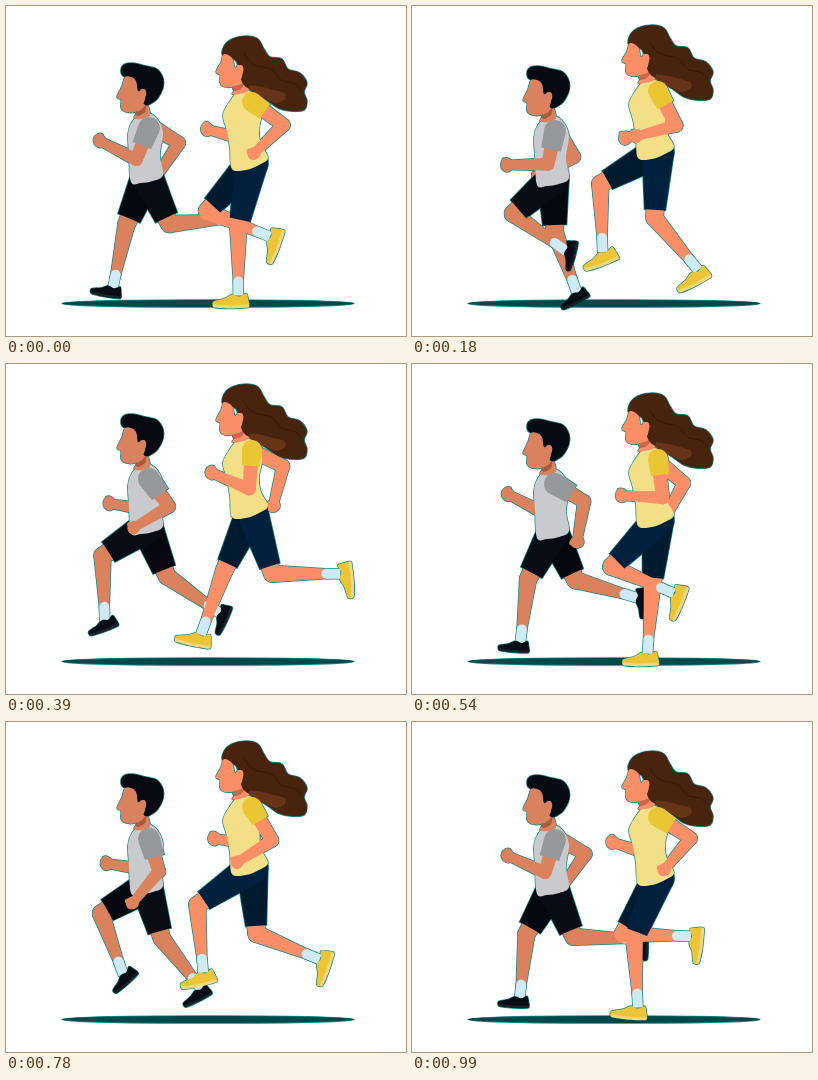
An HTML page with a canvas that plays this animation: 400x330 px, repeating every 1020 ms.

```html
<!DOCTYPE html>
<html lang="en">
<head>
<meta charset="utf-8">
<title>Runners</title>
<style>
html, body { margin: 0; width: 100%; height: 100%; overflow: hidden; background: #fff; }
canvas { display: block; width: 400px; height: 330px; }
</style>
</head>
<body>
<canvas id="stage" width="400" height="330"></canvas>
<script>
const ctx = document.getElementById('stage').getContext('2d');
const LOOP = 1020, HALF = LOOP / 2, STEP = 30;
const FRINGE = '#128a87';
let fringe = false;

// Periodic monotone cubic through rows of [time, ...values]
function sample(rows, period, time) {
  const n = rows.length;
  const row = i => rows[((i % n) + n) % n];
  const at = i => row(i)[0] + Math.floor(i / n) * period;
  const t = ((time % period) + period) % period;
  let i = n - 1;
  while (i >= 0 && at(i) > t) i--;
  const h = at(i + 1) - at(i), u = (t - at(i)) / h;
  return row(0).slice(1).map((_, c) => {
    const v = k => row(k)[c + 1];
    const rise = k => (v(k + 1) - v(k)) / (at(k + 1) - at(k));
    const slope = k => {
      const a = rise(k - 1), b = rise(k);
      return a * b <= 0 ? 0 : 2 * a * b / (a + b);
    };
    const p = v(i), q = v(i + 1);
    return p + (q - p) * u * u * (3 - 2 * u)
      + h * u * (1 - u) * (slope(i) * (1 - u) - slope(i + 1) * u);
  });
}

function paint(color) {
  if (fringe) {
    ctx.strokeStyle = FRINGE;
    ctx.lineWidth = 1.5;
    ctx.stroke();
  } else {
    ctx.fillStyle = color;
    ctx.fill();
  }
}

// Smooth closed outline through x,y pairs
function blob(color, p, tension = 6) {
  const n = p.length / 2;
  const X = i => p[((i + n) % n) * 2], Y = i => p[((i + n) % n) * 2 + 1];
  ctx.beginPath();
  ctx.moveTo(X(0), Y(0));
  for (let i = 0; i < n; i++) {
    ctx.bezierCurveTo(
      X(i) + (X(i + 1) - X(i - 1)) / tension, Y(i) + (Y(i + 1) - Y(i - 1)) / tension,
      X(i + 1) - (X(i + 2) - X(i)) / tension, Y(i + 1) - (Y(i + 2) - Y(i)) / tension,
      X(i + 1), Y(i + 1));
  }
  ctx.closePath();
  paint(color);
}

function oval(color, x, y, rx, ry, turn = 0) {
  ctx.beginPath();
  ctx.ellipse(x, y, rx, ry, turn, 0, Math.PI * 2);
  paint(color);
}

// Tapered segment; a flat one ends in a straight hem
function limb(color, a, b, ra, rb, flat) {
  const g = Math.atan2(b.y - a.y, b.x - a.x), q = Math.PI / 2;
  ctx.beginPath();
  ctx.arc(a.x, a.y, ra, g + q, g + 3 * q);
  if (flat) {
    ctx.lineTo(b.x + rb * Math.sin(g), b.y - rb * Math.cos(g));
    ctx.lineTo(b.x - rb * Math.sin(g), b.y + rb * Math.cos(g));
  } else {
    ctx.arc(b.x, b.y, rb, g - q, g + q);
  }
  ctx.closePath();
  paint(color);
}

// Angle in degrees from straight down, positive towards the left
function reach(p, angle, length) {
  const a = angle * Math.PI / 180;
  return { x: p.x - Math.sin(a) * length, y: p.y + Math.cos(a) * length };
}

function shoe(p, foot, look) {
  ctx.save();
  ctx.translate(p.x, p.y);
  ctx.rotate(-foot * Math.PI / 180);
  ctx.scale(look.shoeSize, look.shoeSize);
  blob(look.shoe, [-6, 7, 1, 9, 8, 6, 10, 12, 10, 19, -8, 20, -24, 19, -25, 14, -14, 11], 7);
  blob(look.sole, [10, 17, 10, 20, -8, 21, -24, 20, -25, 17, -8, 18], 12);
  ctx.restore();
}

function leg(hip, [thigh, shin, foot], look, shorts) {
  const knee = reach(hip, thigh, look.thigh);
  const ankle = reach(knee, shin, look.shin);
  limb(look.skin, hip, knee, 12, look.knee);
  limb(look.skin, knee, ankle, look.knee, 4.5);
  limb(look.sock, reach(ankle, shin, -6), reach(ankle, shin, 8), 5, 5, true);
  shoe(ankle, foot, look);
  limb(shorts, hip, reach(hip, thigh, look.hem), look.seat, look.cuff, true);
}

function arm(shoulder, [upper, fore], look, sleeve) {
  const elbow = reach(shoulder, upper, look.upper);
  const hand = reach(elbow, fore, look.fore);
  limb(look.skin, shoulder, elbow, 7.5, 6.5);
  limb(look.skin, elbow, hand, 6.5, 4.5);
  oval(look.skin, hand.x, hand.y, 7, 6.3, -fore * Math.PI / 180);
  const thumb = reach(hand, fore + 70, 5);
  oval(look.skin, thumb.x, thumb.y, 3, 2.6);
  if (sleeve) {
    limb(look.sleeve, shoulder, reach(shoulder, upper, look.sleeveLength), look.cap, look.cap - 1, true);
  }
}

const woman = {
  skin: '#f98e67', sock: '#cdebf1', shoe: '#ebc537', sole: '#efd77a', sleeve: '#ebc634',
  nearShorts: '#01203d', farShorts: '#001a30',
  thigh: 66, shin: 60, hem: 58, seat: 16, cuff: 10.5, knee: 8.5, shoeSize: 1,
  upper: 39, fore: 41, sleeveLength: 16, cap: 10
};
const man = {
  skin: '#d9825d', sock: '#cfeaf2', shoe: '#080c14', sole: '#1b2027', sleeve: '#96999c',
  nearShorts: '#080c15', farShorts: '#05080f',
  thigh: 53, shin: 57, hem: 46, seat: 16, cuff: 12, knee: 8.5, shoeSize: 0.85,
  upper: 34, fore: 41, sleeveLength: 19, cap: 11
};

// [ms, thigh, shin, foot]
const womanStride = [
  [0, 12, 0, 0], [30, 5, 4, 0], [120, 0, -15, 8], [180, 3, -40, 27], [270, -4, -68, 70],
  [390, -18, -90, 94], [480, 32, -88, 82], [510, 43, -68, 69], [540, 45, -67, 67],
  [630, 62, -36, 45], [690, 61, -2, 20], [780, 56, -5, 12], [900, 25, 20, -12], [990, 21, -3, -5]
];
const manSwing = [
  [120, 15, -81, 75], [180, 49, -55, 75], [270, 60, -20, 42], [390, 57, -2, 20], [480, 30, 6, -3]
];
const manPush = [
  [630, 14, -9, 3], [690, -2, -20, 27], [780, -16, -38, 27], [900, -22, -55, 65]
];
const manNear = [[0, -25, -95, 90], ...manSwing, [540, 28, 7, -5], ...manPush, [990, -23, -88, 90]];
const manFar = [[30, -25, -74, 85], ...manSwing, [510, 23, 12, -10], ...manPush];

// [ms, upper arm, forearm]
const womanNearArm = [
  [0, -54, 46], [180, -28, 75], [390, 4, 113], [540, -7, 93],
  [630, -40, 67], [780, -31, 58], [990, -57, 40]
];
const womanFarArm = [
  [0, 2, 105], [180, -16, 75], [390, -64, 14], [540, -50, 28],
  [630, -25, 70], [780, -10, 98], [990, 4, 108]
];
const manNearArm = [
  [0, 22, 117], [180, 12, 89], [390, -36, 59], [540, -59, 10],
  [630, -39, 20], [780, -17, 40], [990, 17, 114]
];
const manFarArm = [
  [0, -58, 33], [180, -32, 60], [390, 0, 99], [540, 20, 117],
  [630, 17, 108], [780, 5, 99], [990, -60, 35]
];

// [ms, top of head]
const womanTop = [[0, 30], [30, 29], [120, 20], [180, 19], [270, 19], [390, 20], [480, 29]];
const manTop = [
  [0, 57], [120, 62], [180, 60], [270, 52], [390, 50], [480, 53],
  [540, 55], [630, 62], [690, 60], [780, 52], [900, 50], [990, 53]
];

function lifted(dy, draw) {
  ctx.save();
  ctx.translate(0, dy);
  draw();
  ctx.restore();
}

function womanBody() {
  blob('#f3df88', [232, 86, 224, 95, 217, 109, 221, 125, 224, 143, 226, 163, 240, 164,
    253, 159, 262, 152, 255, 138, 253, 124, 256, 107, 253, 92, 243, 85]);
}

function womanHead() {
  blob(woman.skin, [229, 72, 230, 82, 226, 88, 233, 88, 243, 84, 240, 70]);
  blob('#c9684a', [227, 81, 235, 78, 239, 75, 236, 82, 229, 85]);
  blob('#48240f', [217, 50, 218, 40, 226, 33, 240, 30, 252, 33, 258, 43, 264, 51, 276, 53,
    282, 63, 294, 67, 301, 77, 298, 86, 301, 95, 298, 104, 284, 105, 272, 102, 262, 95,
    250, 88, 243, 83, 236, 76, 230, 55]);
  if (!fringe) {
    blob('#663416', [243, 80, 256, 81, 267, 84, 278, 87, 279, 93, 270, 97, 260, 93, 249, 88]);
    ctx.strokeStyle = '#32170a';
    ctx.lineWidth = 0.8;
    ctx.beginPath();
    ctx.moveTo(238, 47);
    ctx.bezierCurveTo(248, 68, 262, 55, 271, 69);
    ctx.bezierCurveTo(277, 81, 288, 71, 295, 84);
    ctx.stroke();
  }
  blob(woman.skin, [218, 48, 215, 56, 210, 66, 214, 69, 214, 77, 219, 81, 229, 80, 235, 73,
    237, 65, 236, 60, 232, 59, 229, 62, 226, 52]);
  oval(woman.skin, 234, 64, 3.4, 5, 0.2);
}

function manBody() {
  blob('#c9cacd', [134, 109, 126, 116, 122, 128, 123, 148, 125, 176, 135, 177, 147, 175,
    157, 169, 154, 149, 157, 127, 152, 114, 143, 107]);
}

function manHead() {
  blob(man.skin, [131, 98, 131, 106, 128, 112, 136, 113, 144, 109, 140, 96]);
  blob('#aa5b3d', [130, 107, 136, 103, 140, 99, 139, 106, 132, 110]);
  blob('#060b13', [117, 70, 115, 63, 119, 58, 127, 57, 140, 60, 151, 63, 157, 72, 157, 82,
    152, 92, 146, 97, 139, 99, 132, 88, 127, 73]);
  blob(man.skin, [119, 71, 116, 80, 111, 91, 115, 94, 115, 102, 120, 106, 129, 106, 136, 100,
    139, 93, 139, 86, 136, 83, 132, 85, 130, 75, 125, 71]);
  oval(man.skin, 137, 88, 3.2, 5, 0.2);
}

function drawWoman(t) {
  const top = sample(womanTop, HALF, t)[0];
  const hip = { x: 246, y: top + 127 };
  const near = sample(womanStride, LOOP, t), far = sample(womanStride, LOOP, t + HALF);
  arm({ x: 242, y: top + 65 }, sample(womanFarArm, LOOP, t), woman);
  leg(hip, far, woman, woman.farShorts);
  leg(hip, near, woman, woman.nearShorts);
  lifted(top - 30, () => { womanBody(); womanHead(); });
  arm({ x: 246, y: top + 66 }, sample(womanNearArm, LOOP, t), woman, true);
}

function drawMan(t) {
  const top = sample(manTop, LOOP, t)[0];
  const hip = { x: 141, y: top + 113 };
  arm({ x: 144, y: top + 62 }, sample(manFarArm, LOOP, t), man);
  leg(hip, sample(manFar, LOOP, t + HALF), man, man.farShorts);
  leg(hip, sample(manNear, LOOP, t), man, man.nearShorts);
  lifted(top - 57, () => { manBody(); manHead(); });
  arm({ x: 143, y: top + 65 }, sample(manNearArm, LOOP, t), man, true);
}

function scene(t) {
  oval('#03494a', 202, 297.5, 146, 3.6);
  drawMan(t);
  drawWoman(t);
}

const start = performance.now();
function tick() {
  const t = Math.floor(((performance.now() - start) % LOOP) / STEP) * STEP;
  ctx.fillStyle = '#fff';
  ctx.fillRect(0, 0, 400, 330);
  fringe = true;
  scene(t);
  fringe = false;
  scene(t);
  requestAnimationFrame(tick);
}
tick();
</script>
</body>
</html>
```
